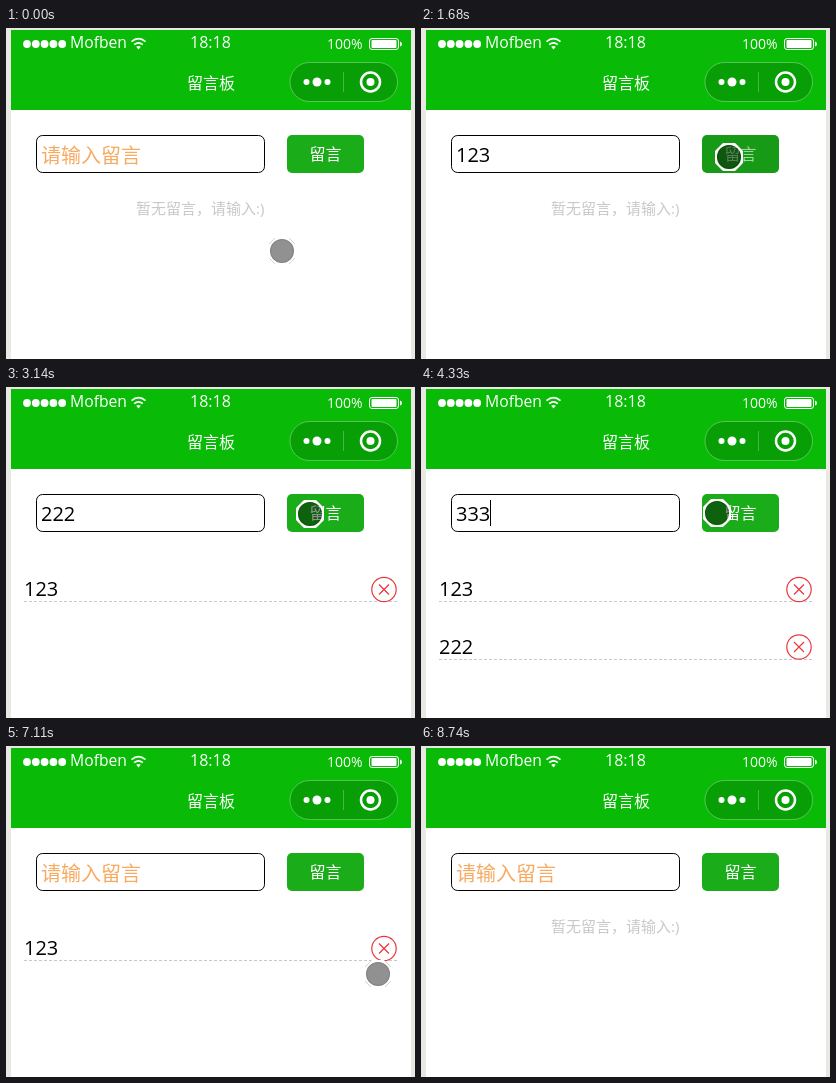
An HTML page that plays this animation: 409x331 px, repeating every 9.14 s.

```html
<!DOCTYPE html>
<html lang="zh-CN">
<head>
<meta charset="utf-8">
<title>留言板</title>
<style>
  html, body { margin: 0; width: 100%; height: 100%; overflow: hidden; background: #e9e9e4; }
  svg { display: block; width: 409px; height: 331px; }
  text { font-family: "Open Sans", "Noto Sans CJK SC", "Noto Sans CJK", sans-serif; white-space: pre; }
  .white { fill: #fff; }
  .line { fill: none; stroke: #fff; }
  .mid { text-anchor: middle; }
  .big { font-size: 20px; }
  #button rect { fill: #1aad19; }
  #button.pressed rect { fill: #179b16; }
  #button.pressed text { fill-opacity: .6; }
</style>
</head>
<body>
<svg viewBox="0 0 409 331">
  <rect x="5" y="2" width="400" height="329" fill="#fff"/>
  <rect x="5" y="2" width="400" height="80" fill="#09bb07"/>

  <g class="white">
    <g id="signal"></g>
    <text x="64" y="20" font-size="15.7">Mofben</text>
    <text x="204.5" y="20" font-size="16" class="mid">18:18</text>
    <text x="321" y="21" font-size="14">100%</text>
    <text x="205" y="61" font-size="16" class="mid">留言板</text>
    <rect x="365.5" y="12" width="25" height="8" rx="1"/>
    <path d="M394 13.5q2 .5 2 2.500t-2 2.500z"/>
    <path d="M132.500 21.500l-2.300-2.700q2.300-1.800 4.600 0z"/>
  </g>
  <g class="line">
    <path d="M125.500 13.700q7-6 14 0M128.200 16.700q4.300-3.600 8.600 0" stroke-width="1.700"/>
    <rect x="363.500" y="10.500" width="29" height="11" rx="2.500"/>
  </g>

  <rect x="284" y="34.500" width="107.500" height="39" rx="19.500" fill="#000" fill-opacity=".15" stroke="#fff" stroke-opacity=".3"/>
  <path d="M337.500 44v20" class="line" stroke-opacity=".25"/>
  <g class="white">
    <circle cx="300.500" cy="54" r="3"/>
    <circle cx="311" cy="54" r="4.500"/>
    <circle cx="321.500" cy="54" r="3"/>
    <circle cx="364.500" cy="54" r="4"/>
  </g>
  <circle cx="364.500" cy="54" r="9.500" class="line" stroke-width="2.500"/>

  <rect x="30.500" y="107.500" width="228" height="37" rx="6" fill="#fff" stroke="#000"/>
  <text id="hint" class="big" x="35" y="134.500" fill="#f7ab62">请输入留言</text>
  <text id="typed" class="big" x="35" y="134"></text>
  <rect id="caret" y="113" width="1" height="26"/>

  <g id="button">
    <rect x="281" y="107" width="77" height="38" rx="5"/>
    <text x="319.500" y="132" font-size="16" class="white mid">留言</text>
  </g>

  <text id="empty" x="130" y="186" font-size="15" fill="#c8c8c8">暂无留言，请输入:)</text>
  <g id="rows"></g>

  <g id="pointer">
    <path d="M-6-14H6L14-6V6L6 14H-6L-14 6V-6zM-12 0a12 12 0 0 0 24 0a12 12 0 0 0-24 0z" fill="#fff" fill-rule="evenodd"/>
    <path d="M-13-7l6-6M7-13l6 6M13 7l-6 6M-7 13l-6-6" fill="none" stroke="#c4c8c2" stroke-width=".8"/>
    <circle r="12" fill="#000" fill-opacity=".43"/>
    <circle r="11.500" fill="none" stroke="#000" stroke-opacity=".13"/>
  </g>
</svg>
<script>
const LOOP = 9140;
const DIGIT_WIDTH = 11.44;
const MESSAGES = ["123", "222", "333"];

// time, typed text, visible rows, caret shown, button pressed
const STATES = [
  [0, "", 0, 0, 0],
  [360, "", 0, 1, 0],
  [840, "1", 0, 1, 0],
  [910, "12", 0, 1, 0],
  [990, "123", 0, 1, 0],
  [1160, "123", 0, 0, 0],
  [1680, "123", 0, 0, 1],
  [1760, "", 1, 0, 0],
  [2220, "", 1, 1, 0],
  [2300, "2", 1, 1, 0],
  [2380, "22", 1, 1, 0],
  [2460, "222", 1, 1, 0],
  [2990, "222", 1, 0, 0],
  [3310, "222", 1, 0, 1],
  [3380, "", 2, 0, 0],
  [3550, "", 2, 1, 0],
  [3790, "3", 2, 1, 0],
  [3940, "33", 2, 1, 0],
  [4020, "333", 2, 1, 0],
  [4630, "333", 2, 0, 1],
  [4700, "", 3, 0, 0],
  [5870, "", 2, 0, 0],
  [6890, "", 1, 0, 0],
  [7970, "", 0, 0, 0]
];

// first step, last step, step count, destination
const START = [276, 223];
const MOVES = [
  [70, 210, 3, 200, 129],
  [1160, 1530, 6, 308, 129],
  [1830, 1900, 2, 190, 142],
  [2070, 2070, 1, 180, 133],
  [2540, 2840, 5, 278, 127],
  [2990, 3140, 3, 304, 127],
  [3380, 3380, 1, 202, 119],
  [3550, 3550, 1, 202, 118],
  [4100, 4328, 4, 296, 126],
  [4404, 4480, 2, 310, 126],
  [4780, 5170, 6, 373, 312],
  [5800, 5800, 1, 374, 310],
  [6040, 6270, 4, 365, 253],
  [6420, 6580, 3, 371, 257],
  [6970, 7110, 3, 372, 228],
  [7190, 7500, 5, 378, 203],
  [7650, 7650, 1, 378, 201],
  [8350, 8740, 6, 415, 350]
];

const el = id => document.getElementById(id);
const show = (node, on) => node.setAttribute("visibility", on ? "visible" : "hidden");

el("signal").innerHTML = [0, 1, 2, 3, 4]
  .map(i => `<circle cx="${21 + 8.8 * i}" cy="16" r="3.9"/>`).join("");

el("rows").innerHTML = MESSAGES.map((message, i) => {
  const y = 57.5 * i;
  const lineY = Math.floor(214.5 + y) + 0.5;
  return `<g>
    <text class="big" x="18" y="${209 + y}">${message}</text>
    <path d="M18 ${lineY}H393" stroke="#c8c8c8" stroke-dasharray="3 2"/>
    <g transform="translate(378 ${202.5 + y})" fill="none" stroke="#e8373d" stroke-width="1.2">
      <circle r="12.2"/><path d="M-5-5L5 5M5-5L-5 5"/>
    </g>
  </g>`;
}).join("");

function pointerAt(time) {
  let [x, y] = START;
  for (const [first, last, count, toX, toY] of MOVES) {
    if (time < first) break;
    const interval = (last - first) / (count - 1) || 1;
    const step = Math.min(count, Math.floor((time - first) / interval + 0.001) + 1);
    x += (toX - x) * step / count;
    y += (toY - y) * step / count;
  }
  return [x, y];
}

function render(time) {
  const [, text, rowCount, caret, pressed] = STATES.findLast(state => state[0] <= time);
  el("typed").textContent = text;
  show(el("hint"), !text);
  show(el("caret"), caret);
  el("caret").setAttribute("x", Math.round(35 + DIGIT_WIDTH * text.length));
  el("button").classList.toggle("pressed", !!pressed);
  show(el("empty"), !rowCount);
  [...el("rows").children].forEach((row, i) => show(row, i < rowCount));
  el("pointer").setAttribute("transform", `translate(${pointerAt(time).map(Math.round)})`);
}

const origin = performance.now();
function tick() {
  render((performance.now() - origin) % LOOP);
  requestAnimationFrame(tick);
}
tick();
</script>
</body>
</html>
```
